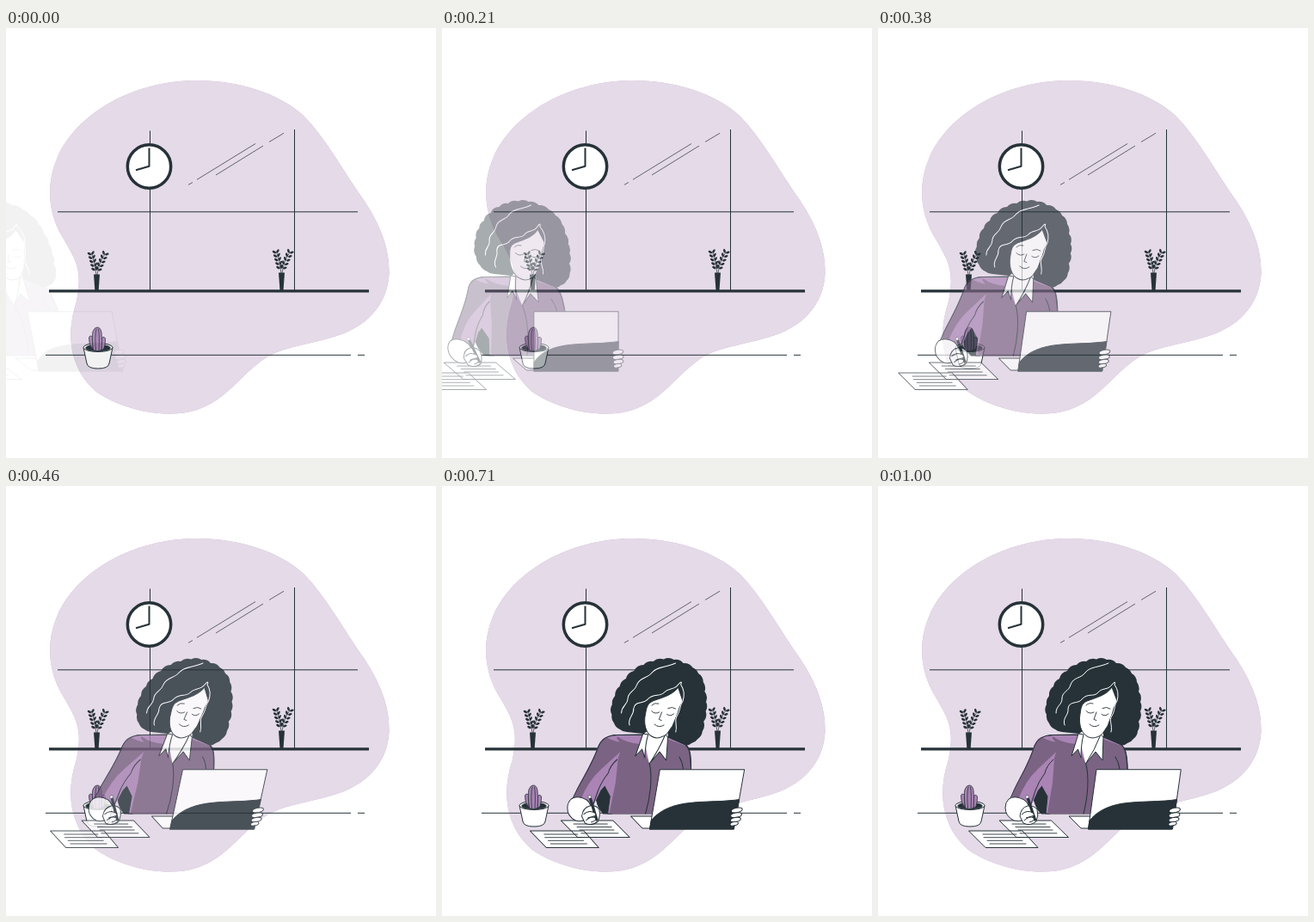
Recreate the animation shown at these times as an HTML page. Size 500x500 px, loop 1040 ms.

```html
<!DOCTYPE html>
<html lang="en">
<head>
<meta charset="utf-8">
<title>Woman at a desk</title>
<style>
  html, body { margin: 0; width: 100%; height: 100%; overflow: hidden; background: #fff; }
  svg { display: block; width: 100%; height: 100%; }
  .line { fill: none; stroke: #263238; stroke-linecap: round; stroke-linejoin: round; }
  .flat { stroke-linecap: butt; }
  .ink { fill: #263238; }
  .base { fill: #a984b4; }
  .shade { fill: #7b6383; stroke: none; }
  .outlined { stroke: #263238; stroke-linejoin: round; }
  .white { fill: #fff; }
  .shine { fill: none; stroke: #fff; stroke-linecap: round; }
</style>
</head>
<body>
<svg viewBox="0 0 500 500">
  <defs>
    <path id="blob" d="M222 61C270 61 318 76 346 102C371 127 394 169 416 200C433 226 446 253 445.5 285C444 322 419 349 378 360C340 371 313 372 292 391C268 410 254 433 222 444C186 456 133 443 105 423C76 398 68 360 82 318C89 283 83 272 65 242C48 212 47 180 60 150C82 100 147 61 222 61Z"/>
    <g id="plant">
      <path class="ink" d="M102 286.500H109L107.500 307H103.500Z"/>
      <path class="line" stroke-width=".7" d="M105 287Q103 272 99.500 262M106 287Q108 272 115 263"/>
      <g id="leaves" class="ink"></g>
    </g>
  </defs>

  <use href="#blob" class="base"/>
  <use href="#blob" fill="#fff" opacity=".7"/>

  <!-- window, shelf and desk edge -->
  <g class="line flat">
    <path d="M167.500 119.500V305M335.500 118V305M60 213.800H409M46 380.300H401M409 380.300H417"/>
    <path stroke-width=".7" d="M212 182.300L217 179.500M222 176.300L290 134.500M244 171L299 137M306 132.500L323 122.300"/>
    <path stroke-width="3.200" d="M50 305.800H422"/>
  </g>

  <circle class="white outlined" cx="166.500" cy="161" r="25.200" stroke-width="3.500"/>
  <path class="line flat" stroke-width="2" d="M166.500 139.500V160.700L151 165.300"/>

  <use href="#plant"/>
  <use href="#plant" x="215" y="-2"/>

  <g class="outlined" stroke-width="1">
    <path class="white" d="M90 371.500L94 390Q95 396 107 396Q119 396 120 390L124 371.500Z"/>
    <ellipse class="white" cx="107" cy="371.500" rx="17" ry="5"/>
    <ellipse class="ink" cx="107" cy="372" rx="14.300" ry="3.700"/>
    <g stroke-width=".8">
      <path class="base" d="M101 374Q96 368 96.500 360Q98 356 101 360V374ZM111 374V362Q113 357 115.500 361Q115.500 370 113 374Z"/>
      <path class="base" d="M101.500 374.500Q99.500 358 101 353Q103 348 106 348Q110 348 111 354Q112 362 111 374.500Q106 377 101.500 374.500Z"/>
      <path class="line" d="M104.500 375Q103 358 105 350M108 375Q109 358 107.500 350"/>
    </g>
  </g>

  <g id="woman" class="outlined" stroke-width="1">
    <path class="ink" d="M194 342Q181 352 181 364Q184 376 190 381H200L199 356Z"/>
    <path id="hair" class="ink" stroke="none"/>

    <!-- torso -->
    <path class="base" d="M232 289L203 289.500Q187 290 182 303L188 345L197 361L195 381H292L290 323Q289 304 283 301L262 292Z"/>
    <path class="shade" d="M203 291Q214 299 230 300L242 323L261 294L283 302Q288 306 289 322L291 381H197L203 345L205 317Q202 305 203 291Z"/>
    <path class="line" d="M241.500 322C246 338 244 362 239 381M283 301.500Q288 305 289 318L290 330M276 315Q280 321 281 329"/>

    <!-- sleeve -->
    <path class="base" stroke="none" d="M197 290Q185 291 181 303C174 324 164 340 158 353L154 363Q165 363 177 374L186 354Q199 341 205 316Q213 297 197 290Z"/>
    <path class="shade" d="M190 292Q183 295 180 307C173 327 164 341 159 353L155 363L163 365Q171 343 186 329Q200 316 218 299Q203 299 190 292Z"/>
    <path class="line" d="M232 289.500L203 289.500Q187 290 182 302C175 324 165 339 159 352L154 363M204 318Q196 325 194 334Q187 343 183 354L177 373"/>

    <!-- neck and collar -->
    <path class="white" stroke="none" d="M239 284L233 289L241.500 323L262 293V282Z"/>
    <path class="white" d="M233 288L225 314L232.500 306L236 316Q236 300 239 289ZM262 292L261 319L253 309L241.500 323Q252 307 259 289Z"/>

    <!-- face -->
    <path class="white" d="M272 234C266 243 254 246 243 250C236 253 236 259 235 265C233 276 236 287 243 291C249 295 257 292 261 288L267 279L272 266L278 250Z"/>
    <path class="line" stroke-width=".9" d="M242 261.500Q246 266 251 263M260 265.500Q264 268.500 268 265M242 255Q245 251.500 250 253M261 258.500Q266 256 270 259M254 263L251 271.500L254 272.500M246 277Q251 282 257 278"/>
    <path class="ink" stroke="none" d="M272 233Q280 241 277 251Q273 258 272 265Q267 275 269 284L266 293L284 302L296 280L293 240Z"/>
    <g class="shine" stroke-width="1">
      <path d="M207 264C207 255 214 255 214 247C214 239 222 239 224 231C227 222 236 224 241 217C246 210 257 211 268 206"/>
      <path d="M217 278C214 269 222 267 221 259C222 249 233 254 237 248C244 240 251 246 256 240C261 234 267 238 272 231Q277 225 275 231Q281 239 278 250C274 256 276 261 272 267C268 273 273 277 271 286"/>
    </g>

    <!-- papers -->
    <path class="white" d="M105.500 401H168L186 420.500H125ZM141 389H201.500L221.500 408.500H161ZM222 384H249L245 398H236Z"/>
    <path class="line" stroke-width=".9" d="M122 405H161M123 408.700H166M127 412.300H168M130 416H172M156 393H195M160 396.500H200M163 400H203M165 403.800H208"/>

    <!-- laptop -->
    <path class="white" d="M254 329.700H352.300L342.500 399H244.500Z"/>
    <path class="ink" d="M244.500 399L246 389C253 380 266 372 284 369.200C305 366.200 330 367.500 347.500 364.500L342 399Z"/>
    <g class="white">
      <ellipse cx="345" cy="377" rx="6.500" ry="2.700" transform="rotate(-12 345 377)"/>
      <ellipse cx="344.500" cy="382.700" rx="6.500" ry="2.700" transform="rotate(-10 344.500 382.700)"/>
      <ellipse cx="344" cy="388" rx="6" ry="2.600" transform="rotate(-10 344 388)"/>
      <ellipse cx="342.500" cy="392.700" rx="4.800" ry="2.200" transform="rotate(-14 342.500 392.700)"/>
    </g>

    <!-- writing hand -->
    <path class="white" d="M152 364Q159 359 170 365Q177 370 176 381Q170 392 158 389Q148 384 148 374Q148 368 152 364Z"/>
    <path class="white" d="M165 384Q166 374 174 372Q181 371 185 376Q187 383 184 390Q177 396 169 392Z"/>
    <path class="line" stroke-width="3.200" d="M174.500 364L182.500 388"/>
    <circle class="white" cx="173.500" cy="361.500" r="1.800" stroke-width=".5"/>
    <path class="white" d="M167 382Q173 376 180 380Q183 383 179 384L172 386M170 389Q176 383 181 386Q183 389 176 391"/>
  </g>
</svg>
<script>
  const $ = id => document.getElementById(id);
  const mix = (a, b, u) => a + (b - a) * u;

  // Scalloped outline of the curls.
  const curls = [206,283, 199,276, 196,266, 196,254, 199,244, 204,233, 211,224, 220,215, 231,208,
    242,204, 254,201.5, 266,202, 277,206, 288,211, 295,218, 301,228, 303,239, 305,251,
    305,262, 303,274, 302,285, 297,294, 290,299, 283,302];
  let outline = "M214 286";
  for (let i = 0; i < curls.length; i += 2) outline += `A12 12 0 0 1 ${curls[i]} ${curls[i + 1]}`;
  $("hair").setAttribute("d", outline + "L240 300L233 288Z");

  // Paired leaves up both stems of a plant.
  let leaves = "";
  for (const [x0, x1, lean] of [[104, 99.5, -15], [106.5, 114.5, 25]]) {
    for (let i = 0; i < 5; i++) {
      const x = mix(x0, x1, i / 4), y = mix(282, 264, i / 4);
      for (const side of [-1, 1])
        leaves += `<ellipse cy="-3" rx="1.300" ry="2.400" transform="translate(${x} ${y}) rotate(${lean + side * 45})"/>`;
    }
  }
  $("leaves").innerHTML = leaves;

  const LOOP = 1040, FRAME = 1000 / 24, CENTER_Y = 310;
  const woman = $("woman");

  // Slide in from the left, lean past upright, then settle.
  function pose(p) {
    const enter = Math.min(1, p / 0.6);
    const lean = p < 0.6 ? mix(20, -10, enter)
      : p < 0.8 ? mix(-10, 2, (p - 0.6) / 0.2)
      : mix(2, 0, Math.min(1, (p - 0.8) / 0.2));
    const slide = -250 * (1 - enter);
    woman.setAttribute("opacity", enter);
    woman.setAttribute("transform",
      `translate(${slide} ${CENTER_Y}) skewX(${lean}) translate(0 ${-CENTER_Y})`);
  }

  const start = performance.now();
  function draw() {
    const t = (performance.now() - start) % LOOP;
    const step = Math.min(24, Math.floor((t + 5) / FRAME));
    pose(0.034 + step * 0.0412);
    requestAnimationFrame(draw);
  }
  draw();
</script>
</body>
</html>
```
